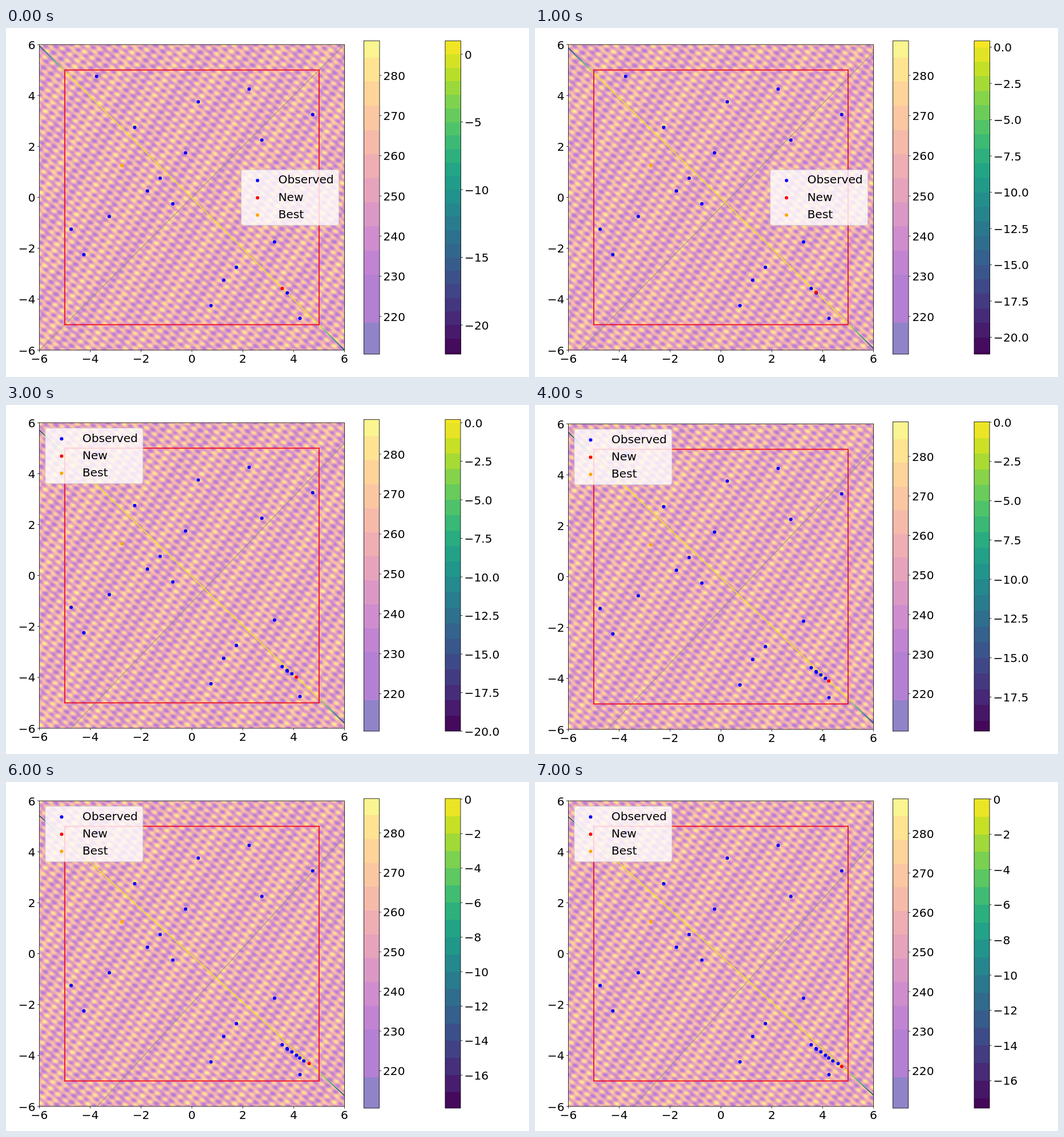
Recreate the animation shown at these times as an HTML page with a canvas. Size 917 by 611 pixels, loop 8 s.

```html
<!DOCTYPE html>
<html>
<head>
<meta charset="utf-8">
<style>
html, body { margin: 0; width: 100%; height: 100%; overflow: hidden; background: #fff; }
canvas { display: block; }
</style>
</head>
<body>
<canvas id="stage" width="917" height="611"></canvas>
<script>
const ctx = document.getElementById('stage').getContext('2d');
const LEFT = 58.5, SIZE = 535, UNIT = SIZE / 12, BAR_BOTTOM = 571;
const PLASMA = '0d0887 41049d 6a00a8 8f0da4 b12a90 cc4778 e16462 f2844b fca636 fcce25 f0f921'.split(' ');
const VIRIDIS = '440154 482475 414487 355f8d 2a788e 21918c 22a884 44bf70 7ad151 bddf26 fde725'.split(' ');

const observed = [
  [-3.75, 4.75], [.25, 3.75], [2.25, 4.25], [-2.25, 2.75], [4.75, 3.25], [2.75, 2.25], [-.25, 1.75],
  [-1.25, .75], [-1.75, .25], [-.75, -.25], [-3.25, -.75], [-4.75, -1.25], [-4.25, -2.25],
  [3.25, -1.75], [1.75, -2.75], [1.25, -3.25], [.75, -4.25], [3.75, -3.75], [4.25, -4.75]
];
const best = [-2.75, 1.25];
const samples = [
  [3.55, -3.58], [3.74, -3.73], [3.93, -3.86], [4.11, -3.99],
  [4.24, -4.1], [4.4, -4.21], [4.61, -4.32], [4.75, -4.43]
];

// top: plot edge, y280/y220: first bar ticks, zero/unit: second bar scale,
// ridge: heights at both sides, cross: x at the bottom and y at the right side
const steps = [
  { top: 29, barTop: 22.5, y280: 83, y220: 505, zero: 46, unit: 23.7, tick: 5, ridge: [31, 564], cross: [58.5, 29] },
  { top: 29, barTop: 22.5, y280: 83, y220: 505, zero: 33.5, unit: 25.4, tick: 2.5, ridge: [35, 561], cross: [80, 42] },
  { top: 29, barTop: 22.5, y280: 83, y220: 505, zero: 33, unit: 25.9, tick: 2.5, ridge: [39, 558], cross: [101, 55] },
  { top: 31, barTop: 25.5, y280: 86, y220: 505.5, zero: 31, unit: 27, tick: 2.5, ridge: [44, 557], cross: [114, 67] },
  { top: 33, barTop: 29.5, y280: 90, y220: 505.5, zero: 30, unit: 27.5, tick: 2.5, ridge: [48, 557], cross: [127, 77] },
  { top: 33, barTop: 29.5, y280: 90, y220: 505.5, zero: 30, unit: 28.8, tick: 2.5, ridge: [54, 553], cross: [144, 87] },
  { top: 33, barTop: 29, y280: 89, y220: 505.5, zero: 30, unit: 30.2, tick: 2, ridge: [59, 549], cross: [160, 96] },
  { top: 33, barTop: 29.5, y280: 90, y220: 505.5, zero: 30, unit: 30.8, tick: 2, ridge: [61, 548], cross: [173, 107] }
];

function sampleMap(map, t, alpha = 1) {
  const p = Math.max(0, Math.min(.9999, t)) * 10, i = Math.floor(p);
  return [0, 2, 4].map(c => {
    const a = parseInt(map[i].substr(c, 2), 16), b = parseInt(map[i + 1].substr(c, 2), 16);
    return Math.round((a + (b - a) * (p - i)) * alpha + 255 * (1 - alpha));
  });
}
const bands = Array.from({ length: 13 }, (_, i) => sampleMap(PLASMA, (i + .5) / 13, .5));
bands[1] = bands[2];

// Crossing waves: short streaks falling to the right, grouped in steep rising rows
function makeLandscape() {
  const canvas = document.createElement('canvas');
  canvas.width = canvas.height = SIZE;
  const c = canvas.getContext('2d'), image = c.createImageData(SIZE, SIZE);
  const wave = (x, y, fx, fy) => Math.cos(2 * Math.PI * (x * fx + y * fy));
  for (let y = 0, k = 0; y < SIZE; y++) {
    for (let x = 0; x < SIZE; x++, k += 4) {
      const v = .53 + .17 * wave(x, y, .062, -.074) + .14 * wave(x, y, .0466, .0302)
        + .05 * wave(x, y, .0117, .0075) + .1 * wave(x, y, .012, .085);
      const band = Math.max(0, Math.min(12, Math.floor(v * 13)));
      image.data.set([...bands[band], 255], k);
    }
  }
  c.putImageData(image, 0, 0);
  return canvas;
}
const landscape = makeLandscape();

function line(x1, y1, x2, y2, color, width) {
  ctx.strokeStyle = color;
  ctx.lineWidth = width;
  ctx.beginPath();
  ctx.moveTo(x1, y1);
  ctx.lineTo(x2, y2);
  ctx.stroke();
}
function frame(x, y, w, h, color, width) {
  ctx.strokeStyle = color;
  ctx.lineWidth = width;
  ctx.strokeRect(x, y, w, h);
}
function dot(x, y, color) {
  ctx.fillStyle = color;
  ctx.beginPath();
  ctx.arc(x, y, 3, 0, 7);
  ctx.fill();
}
function label(text, x, y, align = 'left') {
  ctx.fillStyle = '#000';
  ctx.textAlign = align;
  ctx.fillText(String(text).replace('-', '\u2212'), x, y);
}

function drawPlot(s, index) {
  const bottom = s.top + SIZE, right = LEFT + SIZE;
  const px = x => LEFT + (x + 6) * UNIT, py = y => s.top + (6 - y) * UNIT;
  const mark = (p, color) => dot(px(p[0]), py(p[1]), color);

  ctx.drawImage(landscape, LEFT, s.top);
  ctx.save();
  ctx.beginPath();
  ctx.rect(LEFT, s.top, SIZE, SIZE);
  ctx.clip();
  line(s.cross[0], bottom, right, s.cross[1], 'rgba(135,140,125,.7)', 1.2);
  const fade = ctx.createLinearGradient(LEFT, 0, right, 0);
  [[0, '#2f4a78'], [.025, '#26828e'], [.055, '#50c46a'], [.085, '#ecdc2c']].forEach(([t, color]) => {
    fade.addColorStop(t, color);
    fade.addColorStop(1 - t, color);
  });
  line(LEFT, s.ridge[0], right, s.ridge[1], fade, 1.8);
  ctx.restore();

  frame(px(-5), py(5), 10 * UNIT, 10 * UNIT, '#f00d1c', 1.8);
  observed.concat(samples.slice(0, index)).forEach(p => mark(p, '#00f'));
  mark(samples[index], '#f00');
  mark(best, '#ffa500');

  frame(LEFT, s.top, SIZE, SIZE, '#000', .8);
  for (let v = -6; v <= 6; v += 2) {
    line(px(v), bottom, px(v), bottom + 3.5, '#000', .8);
    line(LEFT - 3.5, py(v), LEFT, py(v), '#000', .8);
    label(v, px(v), bottom + 22, 'center');
    label(v, 51.5, py(v) + 7.5, 'right');
  }
}

function drawLegend(s, index) {
  const x = index < 3 ? 412.5 : 69, y = index < 3 ? 248.3 : s.top + 9.5;
  ctx.beginPath();
  ctx.roundRect(x, y, 171, 97, 4);
  ctx.fillStyle = 'rgba(255,255,255,.8)';
  ctx.fill();
  ctx.strokeStyle = 'rgba(204,204,204,.8)';
  ctx.lineWidth = 1;
  ctx.stroke();
  [['Observed', '#00f'], ['New', '#f00'], ['Best', '#ffa500']].forEach(([name, color], i) => {
    dot(x + 28.5, y + 18.7 + i * 30.2, color);
    label(name, x + 65, y + 24 + i * 30.2);
  });
}

// Stacks [top value, colour] bands from the highest down; each fill runs to the bottom, so no seams show
function drawBar(x, width, top, toY, list) {
  list.reverse().forEach(([high, color], i) => {
    const y = i ? Math.round(toY(high)) : top;
    ctx.fillStyle = `rgb(${color})`;
    ctx.fillRect(x, y, width, BAR_BOTTOM - y);
  });
  frame(x, top, width, BAR_BOTTOM - top, '#000', .8);
}
function barTick(x, y, text) {
  line(x, y, x + 3.5, y, '#000', .8);
  label(text, x + 6.5, y + 7.5);
}

function drawBars(s, index) {
  const width = index < 3 ? 27.5 : 27;
  const scale = (s.y220 - s.y280) / 60, valueY = v => s.y220 - (v - 220) * scale;
  drawBar(627.5, width, s.barTop, valueY, bands.map((color, i) => [218.4 + 6 * i, color]));
  for (let v = 220; v <= 280; v += 10) barTick(627.5 + width, valueY(v), v);

  const logY = v => s.zero - v * s.unit;
  const high = (s.zero - s.barTop) / s.unit, low = (s.zero - BAR_BOTTOM) / s.unit;
  const list = [];
  for (let v = Math.floor(low + .01); v < high - .01; v++) {
    const mid = (Math.max(v, low) + Math.min(v + 1, high)) / 2;
    list.push([v + 1, sampleMap(VIRIDIS, (mid - low) / (high - low))]);
  }
  drawBar(770, width, s.barTop, logY, list);
  for (let v = 0; v >= low - .05; v -= s.tick) {
    barTick(770 + width, logY(v), v.toFixed(s.tick === 2.5 ? 1 : 0));
  }
}

let shown = -1;
function draw(time) {
  const index = Math.floor(time / 1000) % steps.length;
  if (index !== shown) {
    shown = index;
    const s = steps[index];
    ctx.fillStyle = '#fff';
    ctx.fillRect(0, 0, 917, 611);
    ctx.font = '20.2px "DejaVu Sans", sans-serif';
    drawPlot(s, index);
    drawLegend(s, index);
    drawBars(s, index);
  }
  requestAnimationFrame(draw);
}
draw(performance.now());
</script>
</body>
</html>
```
